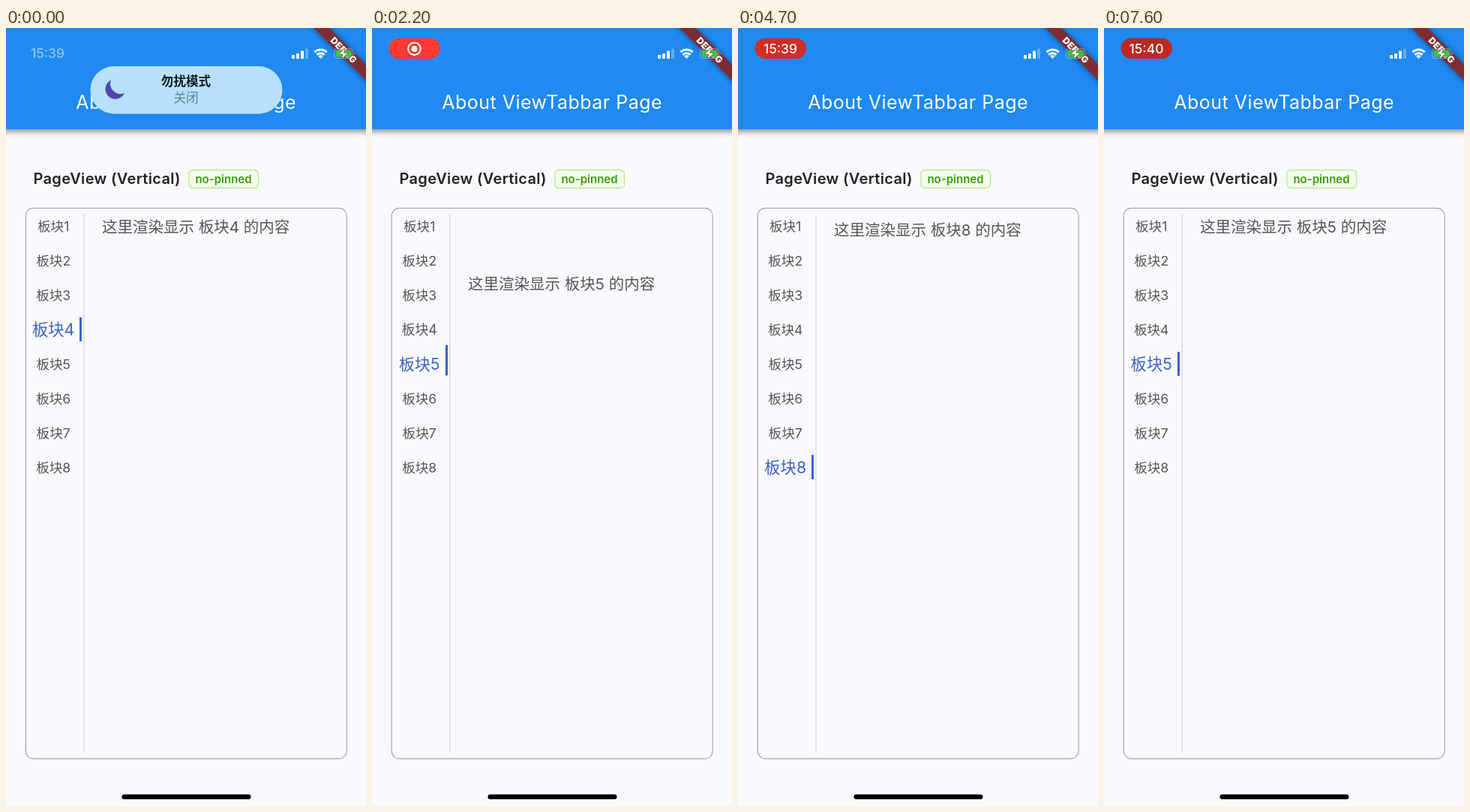
Recreate the animation shown at these times as an HTML page. Size 480 by 1038 pixels, loop 7700 ms.

```html
<!DOCTYPE html>
<html lang="zh">
<head>
<meta charset="utf-8">
<title>About ViewTabbar Page</title>
<style>
  html, body { margin: 0; width: 100%; height: 100%; overflow: hidden; background: #faf9fd; }
  svg { display: block; width: 480px; height: 1038px;
        font-family: Inter, "Noto Sans CJK SC", "Noto Sans CJK", sans-serif; }
  .mid { text-anchor: middle; }
  .clock { font-size: 17.5px; font-weight: 500; fill: #fff; text-anchor: middle; }
  .page { font-size: 20.5px; fill: #555; }
</style>
</head>
<body>
<svg viewBox="0 0 480 1038">
  <defs>
    <clipPath id="clip"><rect x="27" y="241" width="427" height="733" rx="9"/></clipPath>
    <filter id="soft" x="-20%" y="-50%" width="140%" height="200%"><feGaussianBlur stdDeviation="4"/></filter>
  </defs>
  <rect width="480" height="1038" fill="#faf9fd"/>

  <!-- app bar -->
  <rect x="-10" y="100" width="500" height="38" fill="#000" opacity=".45" filter="url(#soft)"/>
  <rect width="480" height="135" fill="#208af2"/>
  <text class="mid" x="240.2" y="108" font-size="25" letter-spacing=".48" fill="#fff">About ViewTabbar Page</text>

  <!-- section title -->
  <text x="36.5" y="208" font-size="20" font-weight="600" letter-spacing=".33" fill="#222">PageView (Vertical)</text>
  <rect x="244" y="189.5" width="92.5" height="24" rx="5" fill="#f5ffeb" stroke="#b7eb8f" stroke-width="1.3"/>
  <text class="mid" x="290" y="206.5" font-size="15" font-weight="600" fill="#389e0d">no-pinned</text>

  <!-- tab panel -->
  <rect x="26.2" y="240.4" width="428" height="734.4" rx="10" fill="none" stroke="#aaa8b0" stroke-width="1.2"/>
  <path d="M104 248V967" stroke="#d9d8de" stroke-width="1.3"/>
  <g id="tabs"></g>
  <rect id="bar" x="98" width="3" fill="#3a62cf"/>
  <g id="pages" clip-path="url(#clip)"></g>

  <rect x="154.5" y="1022.5" width="172" height="6.5" rx="3.2" fill="#000"/>

  <!-- corner ribbon -->
  <g transform="translate(480 0) rotate(45)">
    <rect x="-60" y="34.5" width="120" height="14.8" fill="#000" opacity=".5" filter="url(#soft)"/>
    <rect x="-60" y="34.5" width="120" height="14.8" fill="#7f2b33"/>
    <text class="mid" x="0" y="46.4" font-size="12.2" font-weight="900" letter-spacing=".3" fill="#fff">DEBUG</text>
  </g>

  <!-- status icons -->
  <g fill="#fff">
    <rect x="381" y="36" width="4" height="5" rx="1"/>
    <rect x="387" y="34" width="4" height="7" rx="1"/>
    <rect x="393" y="30.5" width="4" height="10.5" rx="1"/>
    <rect x="399" y="27.5" width="4" height="13.5" rx="1" opacity=".3"/>
    <path d="M419.5 41l-3.3-3.4a4.7 4.7 0 0 1 6.6 0z"/>
  </g>
  <g fill="none" stroke="#fff" stroke-width="2.7">
    <path d="M411.3 32.3a11.7 11.7 0 0 1 16.4 0"/>
    <path d="M414.4 35.7a7.3 7.3 0 0 1 10.2 0"/>
  </g>
  <rect x="437.5" y="27.5" width="25" height="13" rx="4" fill="none" stroke="#fff" opacity=".4"/>
  <rect x="439.3" y="29.3" width="21.4" height="9.4" rx="2.4" fill="#43c04a"/>
  <path d="M464.2 32.2q2 1.8 0 3.8z" fill="#fff" opacity=".5"/>
  <path d="M452.5 26.5l-9 8.5h5.5l-2 7 9-8.8h-5.5z" fill="#fff" stroke="#6b3c35" stroke-width=".6"/>

  <!-- clock and recording pill -->
  <text id="plain" class="clock" x="55.5" y="40.2">15:39</text>
  <g id="pill">
    <rect id="pillBg" x="22.5" y="13.5" width="68.5" height="27.5" rx="13.75"/>
    <g id="rec">
      <circle cx="56.5" cy="27.7" r="8.3" fill="none" stroke="#fff" stroke-width="2"/>
      <circle cx="56.5" cy="27.7" r="4" fill="#fff"/>
    </g>
    <text id="clock" class="clock" x="56.5" y="34">15:39</text>
  </g>

  <!-- system notice -->
  <g id="notice">
    <rect x="112.5" y="51" width="256" height="63.5" rx="31.7" fill="#b9e1fd"/>
    <path d="M140 69.5a13.3 13.3 0 1 0 18 17.3a13.6 13.6 0 0 1-18-17.3z" fill="#4f46b0"/>
    <text class="mid" x="240" y="77.3" font-size="16.6" font-weight="700" fill="#0d1a20">勿扰模式</text>
    <text class="mid" x="240" y="99.3" font-size="16.6" fill="#5b7f90">关闭</text>
  </g>
</svg>
<script>
  const LOOP = 7700, STEP = 100, PITCH = 46, PAGE_H = 735;
  // Each swipe: start time and direction.
  const swipes = [[1815, 1], [2551, 1], [3268, 1], [3985, 1], [5405, -1], [6012, -1], [6620, -1]];
  const DRAG = 0.15, PULL = 0.3;
  const GREY = [85, 85, 85], BLUE = [58, 98, 207];
  const EMBER = [168, 34, 28], GLOW = [255, 59, 48];

  const $ = id => document.getElementById(id);
  const clamp = x => Math.min(1, Math.max(0, x));
  const lerp = (a, b, k) => a + (b - a) * k;
  const mix = (a, b, k) => `rgb(${a.map((v, i) => Math.round(lerp(v, b[i], k)))})`;
  const ramp = (t, from, to) => clamp((t - from) / (to - from));

  // Finger drag, then an overdamped spring to the next page.
  const W = Math.sqrt(200), ROOT = Math.sqrt(1.1 ** 2 - 1);
  const SLOW = W * (1.1 - ROOT), FAST = W * (1.1 + ROOT);
  const A = (FAST * (1 - PULL) - 2 * PULL / DRAG) / (FAST - SLOW), B = 1 - PULL - A;

  function swipe(ms) {
    const s = ms / 1000;
    if (s <= 0) return 0;
    if (s < DRAG) return PULL * (s / DRAG) ** 2;
    const u = s - DRAG;
    return 1 - A * Math.exp(-SLOW * u) - B * Math.exp(-FAST * u);
  }

  function addText(parent, text, attrs) {
    const el = document.createElementNS('http://www.w3.org/2000/svg', 'text');
    for (const k in attrs) el.setAttribute(k, attrs[k]);
    el.textContent = text;
    return parent.appendChild(el);
  }

  const items = Array.from({ length: 8 }, (_, i) => ({
    n: i + 1,
    tab: addText($('tabs'), `板块${i + 1}`, { class: 'mid', y: 6.5, 'font-size': 17.6 }),
    page: addText($('pages'), `这里渲染显示 板块${i + 1} 的内容`, { class: 'page', x: 128, y: 273 })
  }));

  function drawTabs(t) {
    const pos = swipes.reduce((sum, [start, dir]) => sum + dir * swipe(t - start), 4);

    for (const { n, tab, page } of items) {
      const on = clamp(1 - Math.abs(pos - n));
      const cy = 264.3 + (n - 1) * PITCH;
      tab.setAttribute('transform', `translate(63.2 ${cy}) scale(${lerp(1, 1.21, on)})`);
      tab.setAttribute('fill', mix(GREY, BLUE, on));
      page.setAttribute('transform', `translate(0 ${(n - pos) * PAGE_H})`);
      page.style.display = on > 0 ? '' : 'none';
    }

    // The bar stretches between two tabs.
    const low = Math.floor(pos), f = pos - low;
    const head = f * f, tail = 1 - (1 - f) ** 2;
    $('bar').setAttribute('y', 248 + (low - 1 + head) * PITCH);
    $('bar').setAttribute('height', 32 + (tail - head) * PITCH);
  }

  function drawStatus(t) {
    const leave = ramp(t, 800, 1200);
    $('notice').setAttribute('transform', `translate(0 ${-125 * leave * leave})`);

    const shown = ramp(t, 0, 300);
    $('plain').setAttribute('opacity', 0.5 * (1 - shown));
    $('pill').setAttribute('opacity', shown);

    const pulse = (1 + Math.cos((t - 2000) / 4000 * 2 * Math.PI)) / 2;
    $('pillBg').setAttribute('fill', mix(EMBER, GLOW, pulse ** 0.6));

    const swap = ramp(t, 3000, 3400);
    $('rec').setAttribute('opacity', 1 - swap);
    $('clock').setAttribute('opacity', swap);
    $('clock').textContent = t < 5300 ? '15:39' : '15:40';
  }

  function frame(now) {
    const t = Math.floor((now + 5) / STEP) * STEP % LOOP;
    drawTabs(t);
    drawStatus(t);
    requestAnimationFrame(frame);
  }
  frame(0);
</script>
</body>
</html>
```
